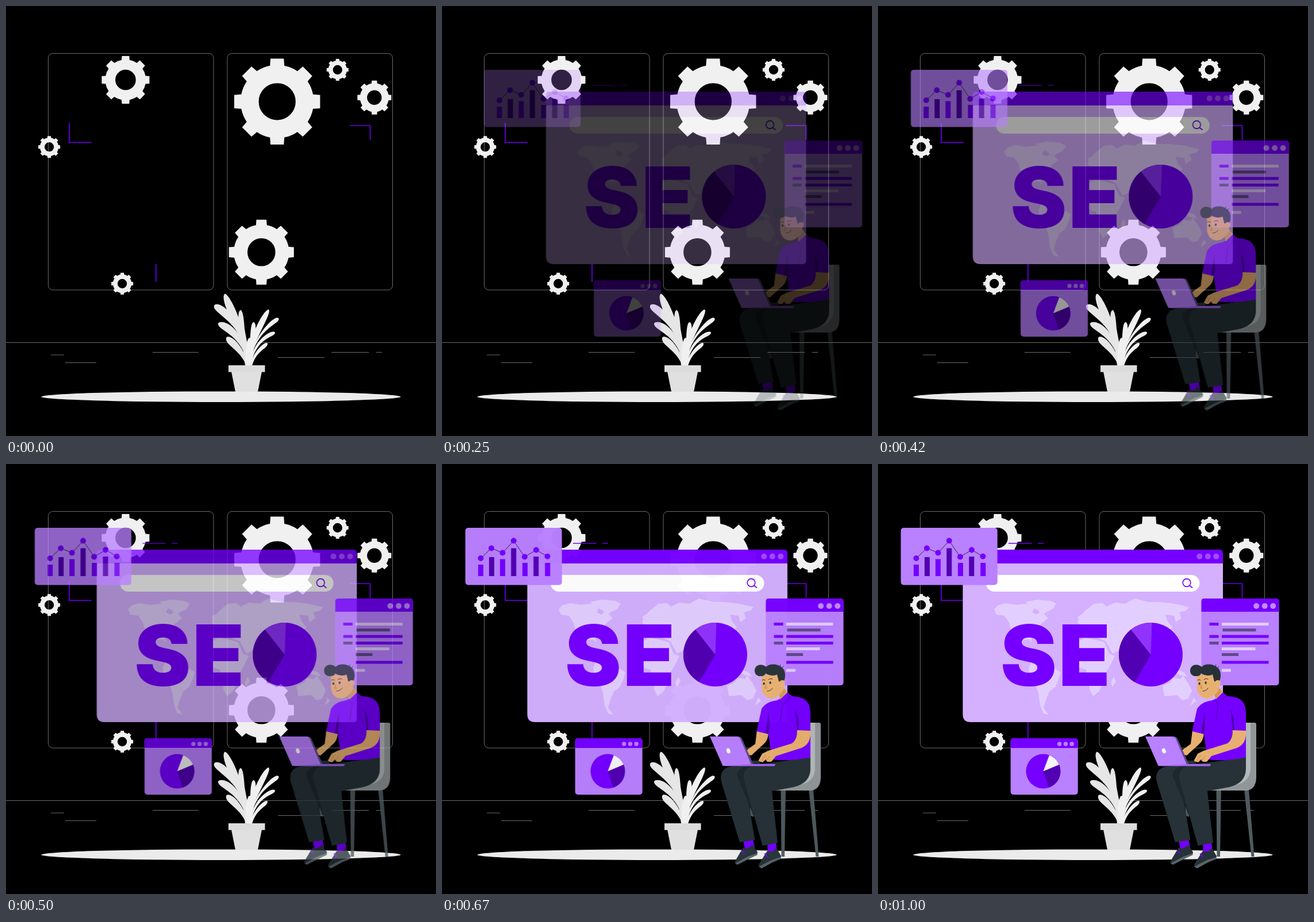
Write an HTML page without scripts that moves like this. It is 748 px wide and 748 px high and loops after 1040 ms.

```html
<!DOCTYPE html>
<html lang="en">
<head>
<meta charset="utf-8">
<title>SEO</title>
<style>
html, body { margin: 0; width: 100%; height: 100%; overflow: hidden; background: #000; }
svg { display: block; width: 100vw; height: 100vh; }
.slide { animation: slide 1040ms infinite both; }
@keyframes slide {
  0% { opacity: 0; transform: translateX(45px); animation-timing-function: cubic-bezier(.37, 0, .63, 1); }
  70.7%, 100% { opacity: 1; transform: none; }
}
.wire { fill: none; stroke: #6a00e6; stroke-width: 1.7; }
.hair { fill: none; stroke: #787878; stroke-width: .9; }
.main { fill: #7500ff; }
.deep { fill: #5200b3; }
.soft { fill: #b980ff; }
.pale { fill: #e3ccff; }
.dusk { fill: #5f4a8a; }
.dark { fill: #263238; }
.skin { fill: #e8b070; }
.seo { font: 900 147px Inter, "Open Sans", sans-serif; }
.ink { fill: none; stroke: #263238; stroke-linecap: round; }
</style>
</head>
<body>
<svg viewBox="0 0 748 748" xmlns="http://www.w3.org/2000/svg">
<defs>
  <path id="teeth" d="M-17-80l1.5-20h31l1.5 20zM-17 80l1.5 20h31l1.5-20z"/>
  <g id="gear" fill="#f0f0f0">
    <circle r="64" fill="none" stroke="#f0f0f0" stroke-width="42"/>
    <use href="#teeth"/>
    <use href="#teeth" transform="rotate(45)"/>
    <use href="#teeth" transform="rotate(90)"/>
    <use href="#teeth" transform="rotate(135)"/>
  </g>
  <g id="dots"><circle r="5"/><circle cx="14.5" r="5"/><circle cx="29" r="5"/></g>
</defs>
<rect width="748" height="748"/>

<!-- room -->
<g class="hair">
  <rect x="73.5" y="82.5" width="287.5" height="411.5" rx="8"/>
  <rect x="385" y="82.5" width="287.5" height="411.5" rx="8"/>
  <path d="M0 585.5H748M78 607H101M103 620.5H157M255 602.5H335M473 611.5H554M566 602.5H631M644 602.5H654"/>
</g>
<use href="#gear" transform="translate(208 128.5) scale(.415)"/>
<use href="#gear" transform="translate(471.7 166.3) scale(.747)"/>
<use href="#gear" transform="translate(444.3 428.3) scale(.565)"/>
<use href="#gear" transform="translate(75.2 245.2) scale(.19)"/>
<use href="#gear" transform="translate(202.2 483) scale(.19)"/>
<use href="#gear" transform="translate(576.8 111) scale(.19)"/>
<use href="#gear" transform="translate(640.8 159.2) scale(.295)"/>
<path class="wire" d="M110 203.500V237.300H148.500M598 208H633.500V233M261 449V480"/>
<ellipse cx="374" cy="679.700" rx="312.500" ry="9.300" fill="#ebebeb"/>

<!-- plant -->
<g fill="#e6e6e6">
  <path d="M413 590C399 560 372 512 380 501C387 498 411 545 416 590Z"/>
  <path d="M411 582C392 542 358 532 362 521C367 513 394 524 415 580Z"/>
  <path d="M411 595C403 560 402 530 408 529C414 530 415 560 417 595Z"/>
  <path d="M415 605C400 568 367 563 369 552C374 545 404 552 417 600Z"/>
  <path d="M418 625C406 596 380 590 383 577C388 570 410 585 421 622Z"/>
  <path d="M408 562L416 626H427L415 562Z"/>
</g>
<g fill="#f0f0f0">
  <path d="M424 597C430 560 450 528 457 528C462 532 445 560 430 594Z"/>
  <path d="M426 602C440 565 468 537 474 543C479 552 446 556 430 600Z"/>
  <path d="M425 602C424 570 426 549 431 550C437 552 434 575 430 602Z"/>
  <path d="M426 614C432 580 464 561 468 568C468 577 440 574 428 616Z"/>
  <path d="M424 626C430 600 452 581 455 587C456 596 436 598 428 626Z"/>
  <path d="M417 626C416 600 418 578 424 577L432 582L427 626Z"/>
</g>
<path d="M392 636H445L438 671H399Z" fill="#e0e0e0"/>
<rect x="387" y="625" width="63.500" height="11.700" fill="#dcdcdc"/>

<!-- browser window -->
<g class="slide">
  <path class="wire" d="M227 138H267.500M278 138H288"/>
  <path d="M147.500 172H600V443Q600 449 594 449H161Q147.500 449 147.500 435.500Z" fill="#d4b0ff"/>
  <path class="main" d="M147.500 173V155Q147.500 149 153.500 149H594Q600 149 600 155V173Z"/>
  <use href="#dots" x="559.300" y="160.800" fill="#a24dff"/>
  <rect x="188" y="193" width="371.500" height="29" rx="14.500" fill="#fff"/>
  <g fill="none" stroke="#7500ff" stroke-width="1.700" stroke-linecap="round"><circle cx="537" cy="206.500" r="6.800"/><path d="M542 211.500L546.500 215"/></g>
  <g fill="#e3cfff">
    <path d="M202 253L208 246L222 242L240 245L258 243L272 250L268 258L276 262L284 256L296 268L286 276L278 284L270 296L266 302L268 310L262 305L252 306L250 316L258 322L266 330L272 340L262 336L246 322L238 308L232 292L228 276L220 264L206 262Z"/>
    <path d="M257 240L276 236L300 238L310 243L304 252L292 258L286 264L278 254L264 248Z"/>
    <path d="M268 342L282 341L298 350L318 362L314 376L308 388L298 396L292 410L288 424L297 436L288 434L282 420L279 398L274 382L264 366L262 354Z"/>
    <path d="M347 276L350 266L362 254L376 243L390 242L398 248L412 241L430 243L446 234L470 240L490 240L516 243L541 249L536 255L524 258L528 268L518 275L515 264L500 262L504 274L512 284L502 296L496 308L486 316L480 330L484 344L474 336L468 322L456 334L450 340L442 320L430 314L420 324L408 330L396 308L386 304L378 298L368 290L360 298L350 300L346 292L356 282Z"/>
    <path d="M346 310L360 302L380 306L394 310L402 330L412 334L404 350L396 364L394 378L384 396L374 404L368 392L366 374L362 358L350 354L342 340Z"/>
    <path d="M495 386L508 380L514 372L526 374L530 368L540 382L546 394L540 408L530 411L520 402L498 404Z"/>
    <path d="M476 346L488 354L502 350L504 360L492 364L480 358ZM514 356L532 362L538 370L522 366ZM549 406L554 412L544 420ZM504 302L514 288L515 300L506 308ZM348 265L354 262L355 274L349 274ZM410 370L414 378L408 388L405 380Z"/>
  </g>
  <text class="main seo" y="386" x="213 314">SE</text>
  <circle class="main" cx="474.500" cy="331.500" r="55.500"/>
  <path class="deep" d="M474.500 331.500L440 288A55.500 55.500 0 0 0 446.500 379.500Z"/>
  <path d="M474.500 331.500L440 288A55.500 55.500 0 0 1 476.500 276Z" fill="#9133ff"/>
</g>

<!-- bar chart -->
<g class="slide">
  <rect class="soft" x="39.700" y="111" width="168" height="99.500" rx="5"/>
  <path class="main" d="M62 175h9v20h-9zM100 165.500h9v29.500h-9zM139 172h9v23h-9zM178.300 172h9v23h-9z"/>
  <path class="deep" d="M81 162h9v33h-9zM119.300 146.500h9v48.500h-9zM158.300 161h9v34h-9z"/>
  <path id="trend" d="M66.500 164L85 146.500L104.500 154.500L123.800 133.500L143 161.500L163 149.500L182.500 160.700" fill="none" stroke="#33264d"/>
  <path d="M66.500 164h0M85 146.500h0M104.500 154.500h0M123.800 133.500h0M143 161.500h0M163 149.500h0M182.500 160.700h0" stroke="#7500ff" stroke-width="10" stroke-linecap="round"/>
</g>

<!-- article -->
<g class="slide">
  <rect class="soft" x="562.500" y="234" width="135" height="151" rx="5"/>
  <path class="main" d="M562.500 257V239Q562.500 234 567.500 234H692.500Q697.500 234 697.500 239V257Z"/>
  <use href="#dots" x="658.200" y="247" fill="#c08cff"/>
  <path class="main" d="M576.500 276h16v5h-16zM576.500 297.500h16v5h-16zM598 297.500h81.500v5h-81.500zM598 309h81.500v5h-81.500zM598 342.500h81.500v5h-81.500z"/>
  <path class="pale" d="M598 276h81.500v5h-81.500zM598 319h58.500v5h-58.500zM598 356.500h16v5h-16z"/>
  <path class="dusk" d="M599.500 286.300h58v5h-58zM576.500 309h16v5h-16zM598 329h29v5h-29z"/>
</g>

<!-- pie card -->
<g class="slide">
  <rect class="soft" x="230.700" y="477" width="117" height="98.300" rx="5"/>
  <path class="main" d="M230.700 494V482Q230.700 477 235.700 477H342.700Q347.700 477 347.700 482V494Z"/>
  <use href="#dots" transform="translate(315.700 487) scale(.74)" fill="#b980ff"/>
  <circle class="main" cx="287.500" cy="534.500" r="30"/>
  <path class="deep" d="M287.500 534.500L315 523A30 30 0 0 1 297 563Z"/>
  <path d="M287.500 534.500L298 506.500A30 30 0 0 1 315 523Z" fill="#f5f5f5"/>
</g>

<!-- man at work -->
<g class="slide">
  <path d="M588.500 566H597L595 683H589.500ZM637 566H645L654.500 683H649.500ZM533 584L538 584L541 614L536 612Z" fill="#4f5a5f"/>
  <path d="M634 450H655Q658 450 658 453V546Q657 567 640 568H566V556H620Q640 552 640 530Z" fill="#919799"/>
  <path d="M634 450H648V532Q646 552 626 557L570 561V545H620Z" fill="#b4b8b9"/>

  <path class="main" d="M523 654L540 652L543 667L526 670ZM565 660L580 658L582 674L566 676Z"/>
  <path class="dark" d="M523 667Q532 672 539 662L548 675L547 680L533 686L513 697Q506 696 510 689ZM565 673Q574 677 581 668L589 682L588 687L574 692L555 703Q547 702 551 695Z"/>
  <path d="M510 694L531 683L547.500 677V680L533 687L513 697ZM551 700L572 689L588.500 684V687L574 693L555 703.500Z" fill="#59656b"/>
  <path d="M520 674l5 3m-3-5l3 7M560 678l6 5m-4-6l2 7" class="wire" stroke-width="1"/>

  <path class="dark" d="M610 516L503 526C486 528 481 541 486 556L517 658L543.500 654L530 575L570 560Z"/>
  <path d="M536 525C518 526 510 534 514 546L541 612L550 580Z" fill="#1d272c"/>
  <path class="dark" d="M640 510L545 524C526 527 520 538 526 555L556.500 664L583 659L573 569L611 562Q640 555 640 530Z"/>

  <path class="skin" d="M547 463L567 468Q566 480 560 486L537 507L524 504L530 497L544 487Z"/>
  <path class="main" d="M583 411L599 398L609 404C632 405 640 415 640 434V510Q606 518 573 514L567 470L546.500 465L555 426Q563 413 583 411Z"/>
  <path class="deep" d="M567 470L562 467L568 432L569 455ZM617 463L613 426L619 442L620 463ZM618 463L620 486L610 492Z"/>
  <path class="skin" d="M617 463L640 464C641 480 636 489 624 494L580 508L572 518H565L562 514L557 519L549 517L556 504L566 499L608 486Q617 480 617 463Z"/>
  <path d="M555 516L562 506M562 517L569 508" fill="none" stroke="#bd8448" stroke-width=".9"/>

  <path class="skin" d="M555 369L555 391Q558 407 572 408Q581 407 586 401L587 411L601 398L593 388L596 374L580 361Z"/>
  <path d="M586 401Q591 398 594 390L598 396L587 411Z" fill="#d19656"/>
  <path class="main" d="M581 411L588 409L600 397L607 404L590 421Z"/>
  <path d="M587 411L592 419L605 404M591 420L588 448" fill="none" stroke="#5200b3"/>
  <path class="dark" d="M554 369C543 370 540 358 546 352C552 347 560 350 563 353C569 346 584 348 589 353C597 358 597 368 595 376L590 380L585 378L582 366C575 370 566 367 562 364Q561 369 554 369Z"/>
  <path class="ink" d="M586 355L588 349M590 356L593 352"/>
  <circle class="skin" cx="591" cy="381" r="5"/>
  <path class="ink" d="M556 376Q558 374 561 376M567 375Q570 372 574 374"/>
  <path class="dark" d="M557.500 382a1.600 2.300 0 1 0 3.200 0a1.600 2.300 0 1 0-3.200 0M568.500 380.500a1.600 2.300 0 1 0 3.200 0a1.600 2.300 0 1 0-3.200 0"/>
  <path d="M562 382L560.500 391L565 391" fill="#d19656"/>
  <path class="ink" d="M565 395Q571 395 574 390"/>

  <path class="dark" d="M533 516H550L555 523H535Z"/>
  <path class="dusk" d="M514 474Q519 474 521 478L541 523H533Z"/>
  <path class="soft" d="M465 474H512Q516 474 518 478L538 525H487.500Z"/>
  <path d="M487 525.500H577Q579 525 579 522H537Z" fill="#a566f5"/>
  <ellipse cx="497.300" cy="499" rx="3.200" ry="4.500" fill="#fff" transform="rotate(-20 497.300 499)"/>
</g>
</svg>
</body>
</html>
```
